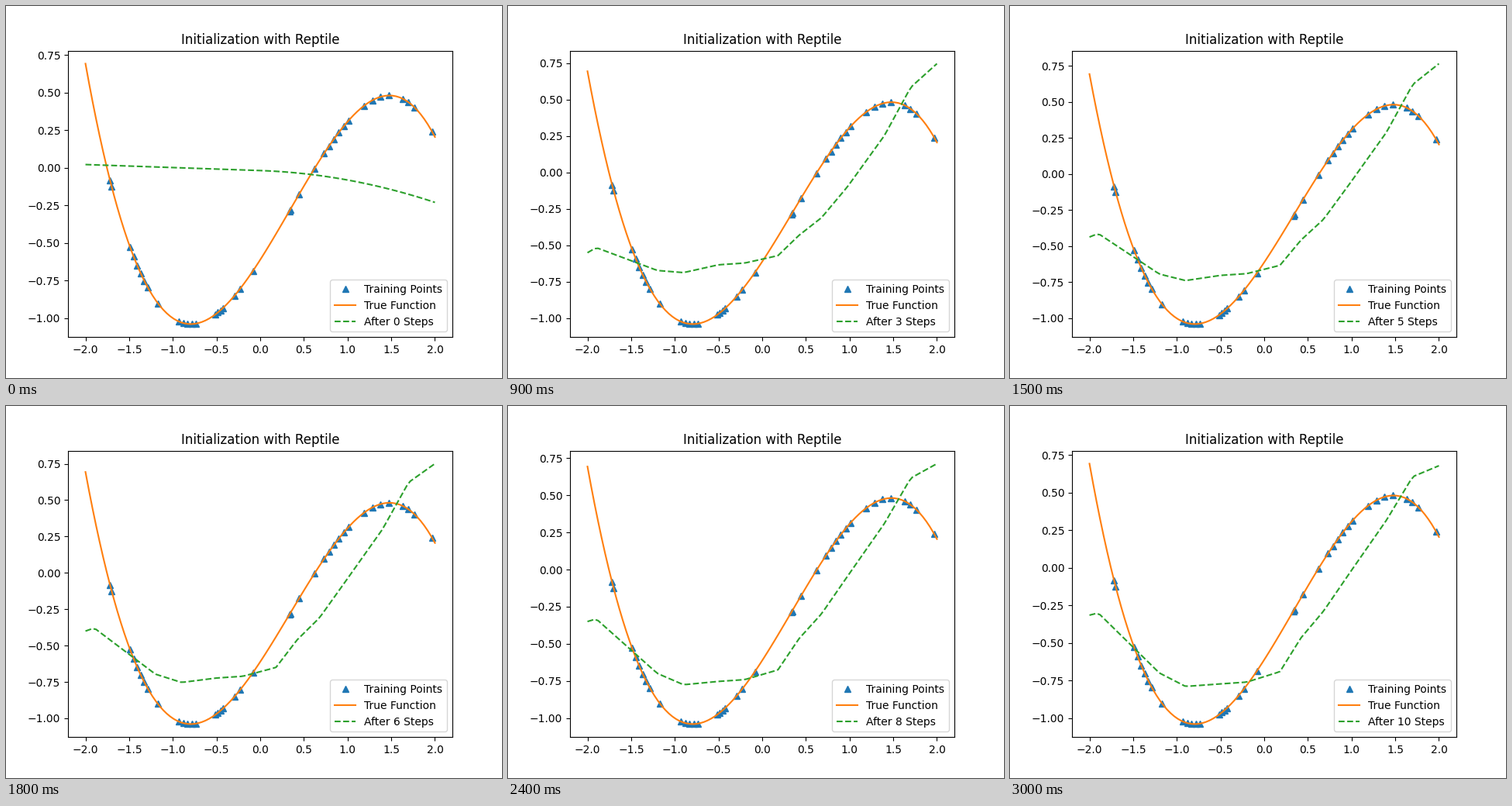
Animation, 640 px wide and 480 px high, one loop 3300 ms. Source, as a matplotlib script:

```python
import matplotlib.pyplot as plt
import numpy as np
from matplotlib.animation import FuncAnimation

STEPS = 11
INTERVAL = 300
SLOW_RATE, FAST_RATE = 0.85, 0.5

# Training inputs: evenly filled clusters and a few single points
TRAIN_X = np.r_[-1.718:-1.7:2j, -1.49:-1.286:6j, -1.171, -0.931:-0.736:5j,
                -0.515:-0.426:4j, -0.293:-0.231:2j, -0.084, 0.333:0.342:2j,
                0.444, 0.621, 0.731:1.011:6j, 1.189:1.473:4j,
                1.632:1.765:3j, 1.969]

# Bends of the fitted curve: x, final height, slow and fast fading error
BENDS = np.array([
    (-2.0, -0.228, -0.44, -0.42),
    (-1.9, -0.219, -0.41, -0.36),
    (-1.2, -0.70, 0.0, 0.22),
    (-0.9, -0.825, 0.18, 0.22),
    (-0.5, -0.822, 0.25, 0.28),
    (-0.2, -0.81, 0.25, 0.28),
    (0.18, -0.731, 0.2, 0.3),
    (0.42, -0.467, 0.0, 0.28),
    (0.68, -0.26, -0.14, 0.29),
    (0.98, -0.009, -0.12, -0.1),
    (1.4, 0.334, -0.08, -0.25),
    (1.7, 0.58, 0.14, -0.66),
    (2.0, 0.586, 0.482, -1.09),
])


def true_function(x):
    return -0.612 + 0.9128 * x + 0.2654 * x**2 - 0.2587 * x**3


def prediction(step, x):
    if step == 0:
        return -0.018 - 0.02 * x - 0.043 * np.maximum(x, 0)**2
    bend_x, final, slow, fast = BENDS.T
    heights = final + slow * SLOW_RATE**step + fast * FAST_RATE**step
    return np.interp(x, bend_x, heights)


fig, ax = plt.subplots(figsize=(6.4, 4.8), dpi=100)
xs = np.linspace(-2, 2, 100)


def draw(step):
    ax.clear()
    ax.set_title("Initialization with Reptile")
    ax.plot(TRAIN_X, true_function(TRAIN_X), "^", label="Training Points")
    ax.plot(xs, true_function(xs), label="True Function")
    ax.plot(xs, prediction(step, xs), "--", label=f"After {step} Steps")
    ax.legend(loc="lower right")


anim = FuncAnimation(fig, draw, frames=STEPS, interval=INTERVAL,
                     init_func=lambda: None, repeat=True, repeat_delay=0)
plt.show()
```
